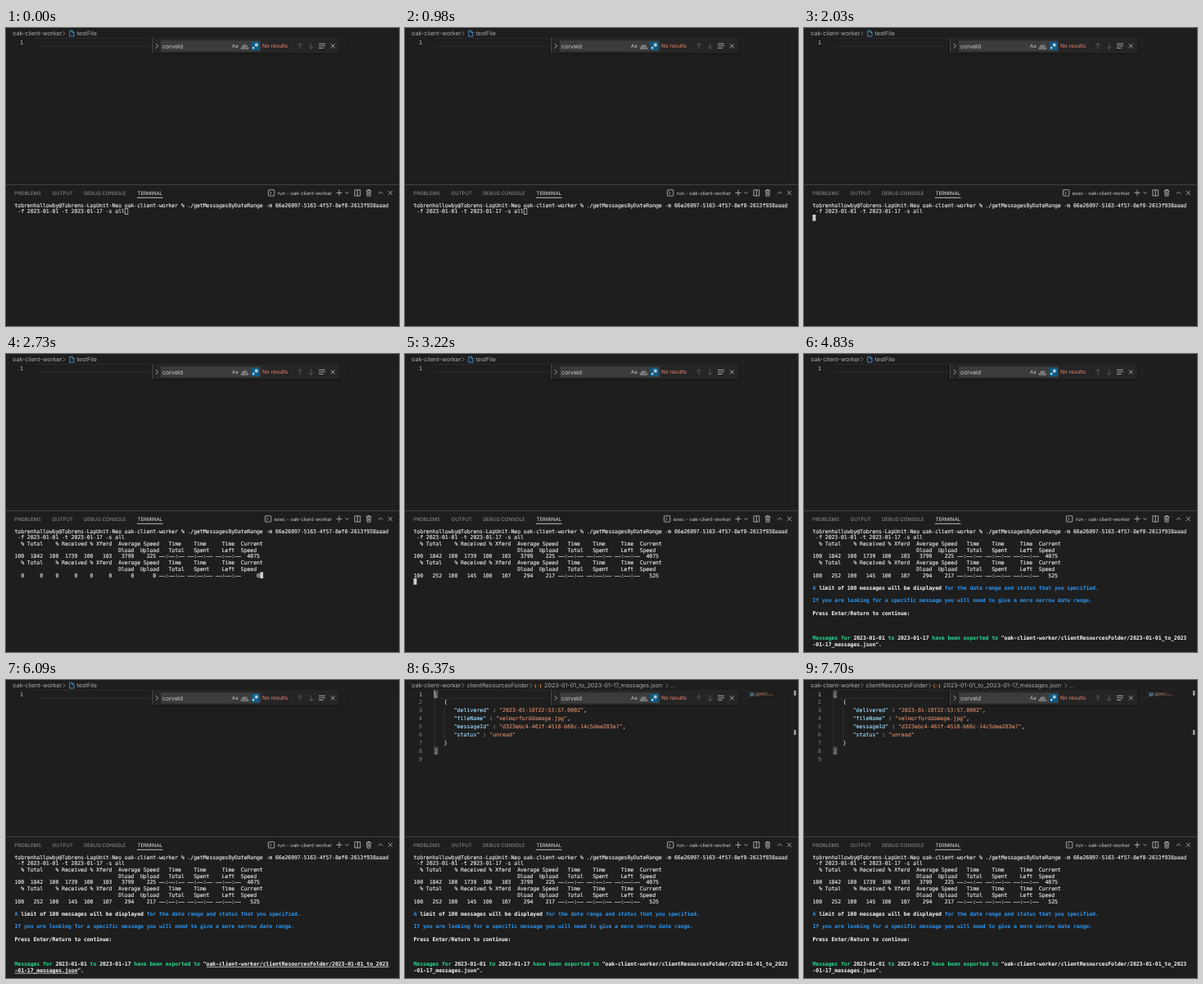
Write an HTML page that moves like this. It is 480x364 px and loops after 7.77 s.

```html
<!DOCTYPE html>
<html lang="en">
<head>
<meta charset="utf-8">
<title>Terminal export</title>
<style>
@property --t { syntax: "<number>"; inherits: true; initial-value: 0; }
@keyframes clock { from { --t: 0; } to { --t: 7770; } }
@keyframes blink {
  0%, 85.58%, 99.09% { opacity: 0; }
  79.27%, 92.78% { opacity: 1; }
}
html, body { margin: 0; width: 100%; height: 100%; overflow: hidden; background: #1e1e1e; }
svg {
  display: block; width: 480px; height: 364px;
  animation: clock 7770ms linear infinite;
  text-rendering: geometricPrecision;
}
text { white-space: pre; font-family: Inter, "Liberation Sans", sans-serif; }

/* Visible while --on <= --t < --off (ms). */
.show {
  --on: -9; --off: 9999;
  opacity: calc(clamp(0, (var(--t) - var(--on) + 1) * 9, 1) * clamp(0, (var(--off) - var(--t) - 1) * 9, 1));
}
.caret { animation: blink 7770ms step-end infinite; }

.crumb { font-size: 7.2px; fill: #adadad; }
.tab { font-size: 6.04px; fill: #949494; }
.tab.active { fill: #e7e7e7; }
.label { font-size: 6.04px; fill: #cccccc; text-anchor: end; }
.find { font-size: 7.1px; fill: #cccccc; }
.mono { font-family: "DejaVu Sans Mono", "Liberation Mono", monospace; font-size: 6.588px; }
.code { fill: #d4d4d4; stroke: #d4d4d4; stroke-width: .12; }
.key { fill: #9cdcfe; stroke: #9cdcfe; }
.str { fill: #d98a68; stroke: #d98a68; }
.num { fill: #858585; text-anchor: end; }
.num.current { fill: #c6c6c6; }
.term { fill: #ececec; stroke: #ececec; stroke-width: .12; letter-spacing: -.123px; }
.blue, .white, .green { font-weight: bold; stroke: none; }
.blue { fill: #2c92ea; }
.white { fill: #f8f8f8; }
.green { fill: #23d98f; }
.icon { fill: none; stroke: #c5c5c5; stroke-width: .8; }
.dim { stroke: #626262; }
.sep { stroke: #8c8c8c; }
</style>
</head>
<body>
<svg viewBox="0 0 480 364">
  <rect width="480" height="364" fill="#1e1e1e"/>

  <!-- editor -->
  <path d="M36 12.6H414M36 22.1H414" stroke="#303030" stroke-width=".8"/>
  <path d="M473 12V191" stroke="#292929" stroke-width=".7"/>
  <text class="crumb" x="8" y="9.1">oak-client-worker</text>
  <path class="icon sep" d="M69.500 4l2.500 2.600-2.500 2.600"/>
  <g class="show" style="--off:6160">
    <path class="icon" style="stroke:#4aa5e0" d="M77.700 3.300h3.300l2 2v4.800h-5.300zM80.800 3.300v2.200h2.200"/>
    <text class="crumb" x="86.500" y="9.1">testFile</text>
  </g>
  <g class="show" style="--on:6160">
    <text class="crumb" x="75.500" y="9.1">clientResourcesFolder</text>
    <path class="icon sep" d="M152.500 4l2.500 2.600-2.500 2.600"/>
    <text class="mono" x="157.600" y="8.900" style="font-size:5.400px;font-weight:bold;fill:#e38d4f">{·}</text>
    <text class="crumb" x="170" y="9.1">2023-01-01_to_2023-01-17_messages.json</text>
    <path class="icon sep" d="M318.500 4l2.500 2.600-2.500 2.600"/>
    <text class="crumb" x="324" y="9.1">...</text>
    <path d="M36.200 22.500V81.700M48 32.400V71.900" stroke="#404040" stroke-width=".6"/>
    <path d="M36 13.200h3.900v8.500h-3.900zM36 82.300h3.900v8.500h-3.900z" fill="#303030" stroke="#888" stroke-width=".6"/>
    <path d="M475 13h2.500v6h-2.500zM475 61h2.500v6h-2.500z" fill="#a0a0a0"/>
    <g id="code"></g>
    <rect class="caret" x="35.400" y="12.500" width="1.100" height="9.800" fill="#aeafad"/>
  </g>
  <g id="minimap" class="show" style="--on:6300"></g>
  <text class="mono num current" x="21" y="19.600">1</text>

  <!-- find widget -->
  <rect x="176.500" y="12" width="232" height="20.500" fill="#171717"/>
  <rect x="178" y="12" width="229.500" height="18.800" fill="#252526"/>
  <path d="M178.500 12V30.800" stroke="#484848"/>
  <path class="icon" d="M182.800 19l2.900 2.900-2.900 2.900"/>
  <rect x="189" y="15.300" width="122" height="13.300" fill="#3c3c3c"/>
  <text class="find" x="191" y="24.500">corveld</text>
  <text class="find" x="276" y="24.200" style="font-size:6px">Aa</text>
  <text class="find" x="288" y="23.700" style="font-size:6px">ab</text>
  <path class="icon" d="M287.300 23.700v1.500h8.400v-1.500"/>
  <rect x="299.400" y="16.800" width="10.200" height="10.400" rx="1.300" fill="#0c5b86"/>
  <path class="icon" style="stroke:#fff" d="M305.800 18.200v5M303.600 19.500l4.400 2.400M308 19.500l-4.400 2.400"/>
  <rect x="301.200" y="23.300" width="2" height="2" fill="#fff"/>
  <text class="find" x="313" y="24.400" style="font-size:6.500px;fill:#f48771">No results</text>
  <path class="icon dim" d="M359 25.500V18.500M356.200 21.300L359 18.500l2.800 2.800M372.700 18.500V25.500M369.900 22.700l2.800 2.800 2.800-2.800"/>
  <path class="icon" d="M382 19.300h8M382 21.900h8M382 24.500h5.500"/>
  <path class="icon" d="M396.700 19.400l5 5M401.700 19.400l-5 5"/>

  <!-- panel header -->
  <path d="M0 191.500H480" stroke="#464646" stroke-width=".9"/>
  <text class="tab" x="10.300" y="203.900">PROBLEMS</text>
  <text class="tab" x="56.600" y="203.900">OUTPUT</text>
  <text class="tab" x="95" y="203.900">DEBUG CONSOLE</text>
  <text class="tab active" x="160.500" y="203.900">TERMINAL</text>
  <path d="M160 207.300H191.500" stroke="#e7e7e7" stroke-width=".8"/>
  <g id="shells"></g>
  <path class="icon" d="M407 197.800v7.200M403.400 201.400h7.200M414.500 200.400l2 2 2-2"/>
  <path class="icon" d="M425.900 197.800h6.800v7.200h-6.800zM429.300 197.800v7.200"/>
  <path class="icon" d="M439.800 198.800h6.400M441.900 198.800v-1.300h2.200v1.300M440.700 198.800l.4 6.400h3.800l.4-6.400M442.200 200.300v3.400M443.800 200.300v3.400"/>
  <path class="icon" d="M454.800 202.700l2.700-2.700 2.700 2.700M466.900 198.900l5 5M471.900 198.900l-5 5"/>

  <!-- terminal -->
  <g id="term"></g>
</svg>

<script>
const $ = id => document.getElementById(id);
const COL = 3.843, ROW = 7.686, LEFT = 10.5, TOP = 212.6;
const LINE = 9.88;
const END = 9999;
const colX = c => LEFT + c * COL;
const rowY = r => TOP + r * ROW;
const span = (cls, s) => `<tspan class="${cls}">${s}</tspan>`;
const show = (on, off, body) =>
  `<g class="show" style="--on:${on};--off:${off}">${body}</g>`;

// Terminal output
const out = (row, s, on = -9, off = END) =>
  show(on, off, `<text class="mono term" x="${LEFT}" y="${rowY(row) + 6.1}">${s}</text>`);
const block = (col, row, on, off) =>
  show(on, off, `<rect x="${colX(col)}" y="${rowY(row)}" width="${COL}" height="${ROW}" fill="#d0d0d0"/>`);
const clocks = " ––:––:––".repeat(3);
const stats = (values, speed) =>
  values.map((v, i) => String(v).padStart([3, 6, 5, 6, 5, 6, 7, 7][i])).join("")
  + clocks + String(speed).padStart(6);
const transfer = (row, start, done, values, speed) =>
  out(row, "  % Total    % Received % Xferd  Average Speed   Time    Time     Time  Current", start)
  + out(row + 1, " ".repeat(33) + "Dload  Upload   Total   Spent    Left  Speed", start)
  + out(row + 2, stats(Array(8).fill(0), 0), start, done)
  + out(row + 2, stats(values, speed), done);

const cursorStops = [
  [1680, 35, 1], [1820, 0, 2], [2100, 78, 4], [2520, 0, 5],
  [2730, 78, 7], [3220, 0, 8], [3290, 32, 13], [4340, 0, 16], [4480]
];

$("term").innerHTML =
  out(0, "tobrenhallowby@Tobrens-LapUnit-Neo oak-client-worker % ./getMessagesByDateRange -m 66e26097-5163-4f57-8ef0-2613f938aaad")
  + out(1, " -f 2023-01-01 -t 2023-01-17 -s all")
  + transfer(2, 2100, 2520, [100, 1842, 100, 1739, 100, 103, 3799, 225], 4075)
  + transfer(5, 2730, 3220, [100, 252, 100, 145, 100, 107, 294, 217], 525)
  + out(9, span("blue", "A ") + span("white", "limit of 100 messages will be displayed")
      + span("blue", " for the date range and status that you specified."), 3290)
  + out(11, span("blue", "If you are looking for a specific message you will need to give a more narrow date range."), 3290)
  + out(13, span("white", "Press Enter/Return to continue:"), 3290)
  + out(17, span("green", "Messages for ") + span("white", "2023-01-01") + span("green", " to ")
      + span("white", "2023-01-17") + span("green", " have been exported to ")
      + span("white", '"oak-client-worker/clientResourcesFolder/2023-01-01_to_2023'), 4480)
  + out(18, span("white", '-01-17_messages.json".'), 4480)
  + show(5670, 6230, `<path d="M${colX(61)} ${rowY(17) + 7.3}H${colX(119)}M${LEFT} ${rowY(18) + 7.3}H${colX(20)}" stroke="#f0f0f0" stroke-width=".7"/>`)
  + show(-9, 1680, `<rect x="${colX(35) + .3}" y="${rowY(1) + .3}" width="${COL - .3}" height="${ROW - .6}" fill="none" stroke="#d0d0d0" stroke-width=".7"/>`)
  + cursorStops.slice(0, -1).map(([on, c, r], i) => block(c, r, on, cursorStops[i + 1][0])).join("");

// Shell name beside the panel tools
const shell = (name, x, on, off) => show(on, off,
  `<rect class="icon" x="${x}" y="197.700" width="7.400" height="7.400" rx=".8"/>
   <path class="icon" d="M${x + 1.8} 199.600l1.900 1.900-1.900 1.900"/>
   <text class="label" x="398" y="203.800">${name} - oak-client-worker</text>`);
$("shells").innerHTML = shell("run", 320.4, -9, 2030)
  + shell("exec", 316.4, 2030, 4550) + shell("run", 320.4, 4550, END);

// Opened file
const fields = [
  ["delivered", "2023-01-10T22:53:57.000Z"],
  ["fileName", "velmorforddamage.jpg"],
  ["messageId", "d323ebc4-461f-4510-b66c-14c5dee283e7"],
  ["status", "unread"]
];
const pairs = fields.map(([k, v], i) =>
  "      " + span("key", `"${k}"`) + " : " + span("str", `"${v}"`) + (i < 3 ? "," : ""));
$("code").innerHTML = ["[", "   {", ...pairs, "   }", "]", ""].map((s, i) => {
  const y = 19.6 + i * LINE;
  const number = i ? `<text class="mono num" x="21" y="${y}">${i + 1}</text>` : "";
  return number + `<text class="mono code" x="35.900" y="${y}">${s}</text>`;
}).join("");

const dash = (col, len, row, color) =>
  `<rect x="${418 + col * .549}" y="${13.4 + row * 1.1}" width="${len * .549}" height=".7" fill="${color}" fill-opacity=".6"/>`;
$("minimap").innerHTML = dash(0, 1, 0, "#d4d4d4") + dash(3, 1, 1, "#d4d4d4")
  + fields.map(([k, v], i) => dash(6, k.length + 2, i + 2, "#9cdcfe")
      + dash(k.length + 11, v.length + 2, i + 2, "#ce9178")).join("")
  + dash(3, 1, 6, "#d4d4d4") + dash(0, 1, 7, "#d4d4d4");
</script>
</body>
</html>
```
